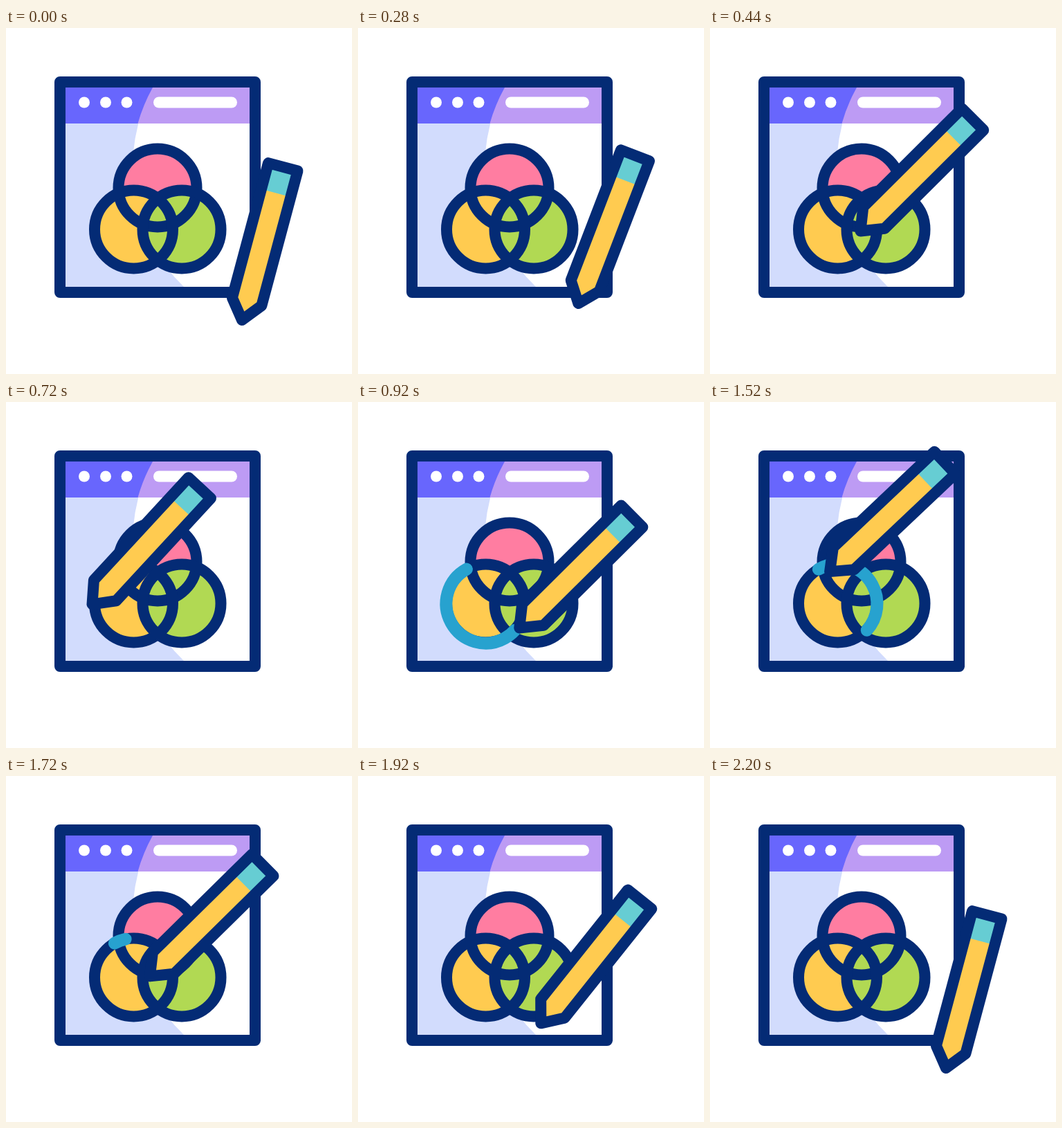
An HTML page for the animation above (2.4 s loop, 500 px wide and 500 px high).

```html
<!DOCTYPE html>
<html lang="en">
<head>
<meta charset="utf-8">
<title>Drawing colour circles</title>
<style>
  html, body { margin: 0; width: 100%; height: 100%; overflow: hidden; background: #fff; }
  svg { display: block; width: 100vw; height: 100vh; }
  .ink { fill: none; stroke: #042b75; stroke-width: 16; stroke-linejoin: round; }
</style>
</head>
<body>
<svg viewBox="0 0 500 500">
  <rect x="78" y="78" width="282" height="304" fill="#fff"/>
  <path d="M78 86H212A241 241 0 0 0 257 374H78Z" fill="#d2dcfd"/>
  <path d="M78 86H360V138H78Z" fill="#bd9bf4"/>
  <path d="M78 86H212A241 241 0 0 0 190.5 138H78Z" fill="#6866fd"/>
  <g fill="#fff">
    <circle cx="113" cy="107.5" r="8"/>
    <circle cx="144" cy="107.5" r="8"/>
    <circle cx="174.5" cy="107.5" r="8"/>
    <rect x="213" y="99.5" width="121" height="16" rx="8"/>
  </g>
  <rect class="ink" x="78" y="78" width="282" height="304"/>

  <circle cx="219" cy="231" r="57" fill="#ff7da1"/>
  <circle cx="184.5" cy="291" r="57" fill="#ffcb50"/>
  <circle cx="254" cy="291" r="57" fill="#b1d953"/>
  <g class="ink">
    <circle cx="219" cy="231" r="56.5"/>
    <circle cx="184.5" cy="291" r="56.5"/>
    <circle cx="254" cy="291" r="56.5"/>
  </g>
  <circle id="trace" r="57" pathLength="360" fill="none" stroke="#27a2cf" stroke-width="18"
    stroke-linecap="round" transform="translate(184.5 291.5) rotate(-119) scale(1 -1)"/>

  <!-- The pencil's tip is its origin -->
  <g id="pencil">
    <path d="M0 0L-22-27.4V-229H22V-27.4Z" fill="#ffcb50"/>
    <path d="M-22-190V-229H22V-190Z" fill="#66cdd3"/>
    <path class="ink" d="M0 0L-22-27.4V-229H22V-27.4Z"/>
  </g>
</svg>
<script>
const LOOP = 2400, DRAW = 600, ERASE = 1200, LEAVE = 1800;
const trace = document.getElementById('trace');
const pencil = document.getElementById('pencil');

const clamp = v => Math.min(1, Math.max(0, v));
const span = (t, from, to) => clamp((t - from) / (to - from));

// Cubic from a to b with slopes m and n at the ends, u in 0..1
function hermite(u, a, b, m = 0, n = 0) {
  const v = 1 - u;
  return a * v * v * (1 + 2 * u) + b * u * u * (3 - 2 * u) + m * u * v * v - n * u * u * v;
}
const ease = u => hermite(u, 0, 1);

// Keys are [time, value, speed per ms]
function track(keys, t) {
  const i = Math.max(1, keys.findIndex(k => k[0] >= t));
  if (t >= keys[keys.length - 1][0]) return keys[keys.length - 1][1];
  const [t0, a, m = 0] = keys[i - 1], [t1, b, n = 0] = keys[i], d = t1 - t0;
  return hermite(span(t, t0, t1), a, b, m * d, n * d);
}

const tipX = [[200, 341], [440, 218, -.55], [DRAW, 155.4], [ERASE, 155.4],
  [1520, 173, .12], [1820, 233, .28], [1920, 264, .3], [2200, 341]];
const tipY = [[200, 422], [440, 294, -.55], [DRAW, 239], [ERASE, 239],
  [1520, 245, .11], [1820, 321, .33], [1920, 357, .33], [2200, 422]];
const tilt = [[200, 15], [500, 48.5], [740, 42.6], [1080, 47.4],
  [ERASE, 45.5], [1500, 46.6], [LEAVE, 45.2], [2200, 15]];

function tipAt(t) {
  if (t < DRAW || t > ERASE) return [track(tipX, t), track(tipY, t)];
  const turn = hermite(span(t, DRAW, ERASE), 0, 1, .617, .4);
  const angle = (119 + 360 * turn) * Math.PI / 180;
  return [184.5 + 60 * Math.cos(angle), 291.5 - 60 * Math.sin(angle)];
}

function render(t) {
  const [x, y] = tipAt(t);
  pencil.setAttribute('transform', `translate(${x} ${y}) rotate(${track(tilt, t)})`);

  const start = 360 * ease(span(t, ERASE, LEAVE));
  const end = 360 * ease(span(t, DRAW, ERASE));
  trace.setAttribute('visibility', end > start ? 'visible' : 'hidden');
  trace.setAttribute('stroke-dasharray', `${end - start} 720`);
  trace.setAttribute('stroke-dashoffset', -start);
}

const begin = performance.now();
function tick() {
  render((performance.now() - begin) % LOOP);
  requestAnimationFrame(tick);
}
tick();
</script>
</body>
</html>
```
